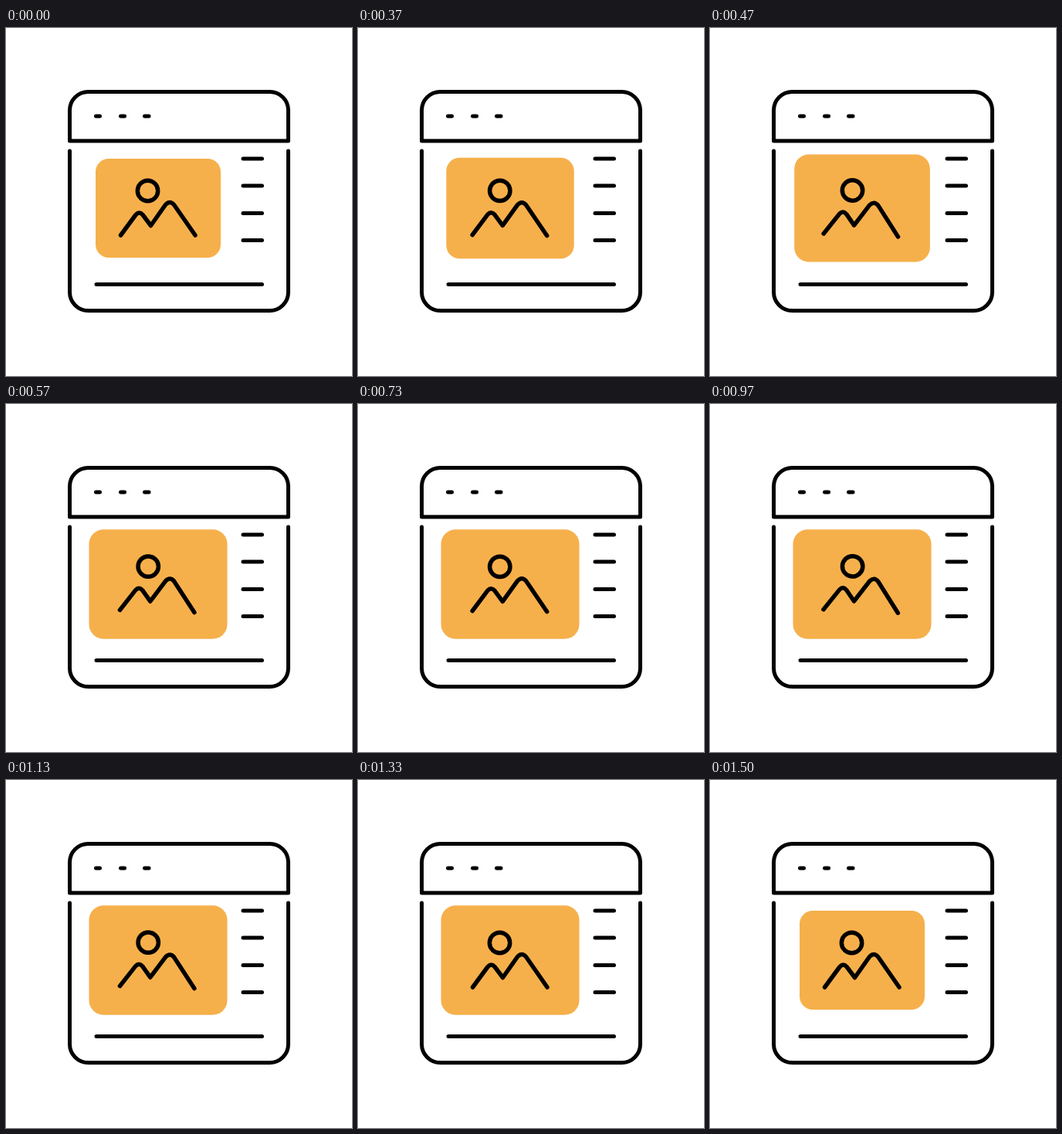
Recreate the animation shown at these times as an HTML page. Size 448 by 450 pixels, loop 1530 ms.

```html
<!DOCTYPE html>
<html lang="en">
<head>
<meta charset="utf-8">
<title>Picture window icon</title>
<style>
  html, body { margin: 0; width: 100%; height: 100%; overflow: hidden; background: #fff; }
  svg { display: block; width: 448px; height: 450px; }
</style>
</head>
<body>
<svg viewBox="0 0 448 450" fill="none" stroke="#000" stroke-width="5" stroke-linecap="round" stroke-linejoin="round">
  <path d="M82.5 146V106.5a24 24 0 0 1 24-24H341.5a24 24 0 0 1 24 24V146Z"/>
  <path d="M82.5 159V341.5a24 24 0 0 0 24 24H341.5a24 24 0 0 0 24-24V159"/>
  <path d="M116.5 114h5M148.5 114h5M179.5 114h5.5"/>
  <path d="M307 169h24.5M307 204h24.5M307 239.5h24.5M307 274.5h24.5M117 331.5H331.5"/>
  <rect id="card" x="116" y="169" width="162" height="128" rx="17" fill="#f6b04b" stroke="none"/>
  <g id="scene" stroke-width="5.5">
    <circle cx="183.5" cy="210.5" r="13.2"/>
    <path d="M148.5 268L168 241.5Q172.5 236.5 177 241.5L187.5 255.5L206.5 228.5Q212 222.5 217.5 228.5L245 268"/>
  </g>
</svg>
<script>
  const LOOP = 1530, FPS = 30, CX = 197, CY = 233;
  const card = document.getElementById('card');
  const scene = document.getElementById('scene');

  // [step, value] pairs, linear in between
  const scaleKeys = [[10, 1], [15, 1.105], [40, 1.105], [45, 1]];
  const angleKeys = [[10, 0], [15, 3], [20, 0], [30, 3], [40, 0]];

  function valueAt(keys, step) {
    if (step <= keys[0][0]) return keys[0][1];
    for (let i = 1; i < keys.length; i++) {
      const [a, from] = keys[i - 1], [b, to] = keys[i];
      if (step <= b) return from + (to - from) * (step - a) / (b - a);
    }
    return keys[keys.length - 1][1];
  }

  function draw(ms) {
    // steps begin on whole hundredths of a second
    const tick = Math.floor(ms / 10) * 10;
    const step = Math.floor((tick + 5) * FPS / 1000);
    const scale = valueAt(scaleKeys, step);
    card.setAttribute('transform', `translate(${CX} ${CY}) scale(${scale}) translate(${-CX} ${-CY})`);
    scene.setAttribute('transform', `rotate(${valueAt(angleKeys, step)} ${CX} ${CY})`);
  }

  const start = performance.now();
  function loop() {
    draw((performance.now() - start) % LOOP);
    requestAnimationFrame(loop);
  }
  loop();
</script>
</body>
</html>
```
